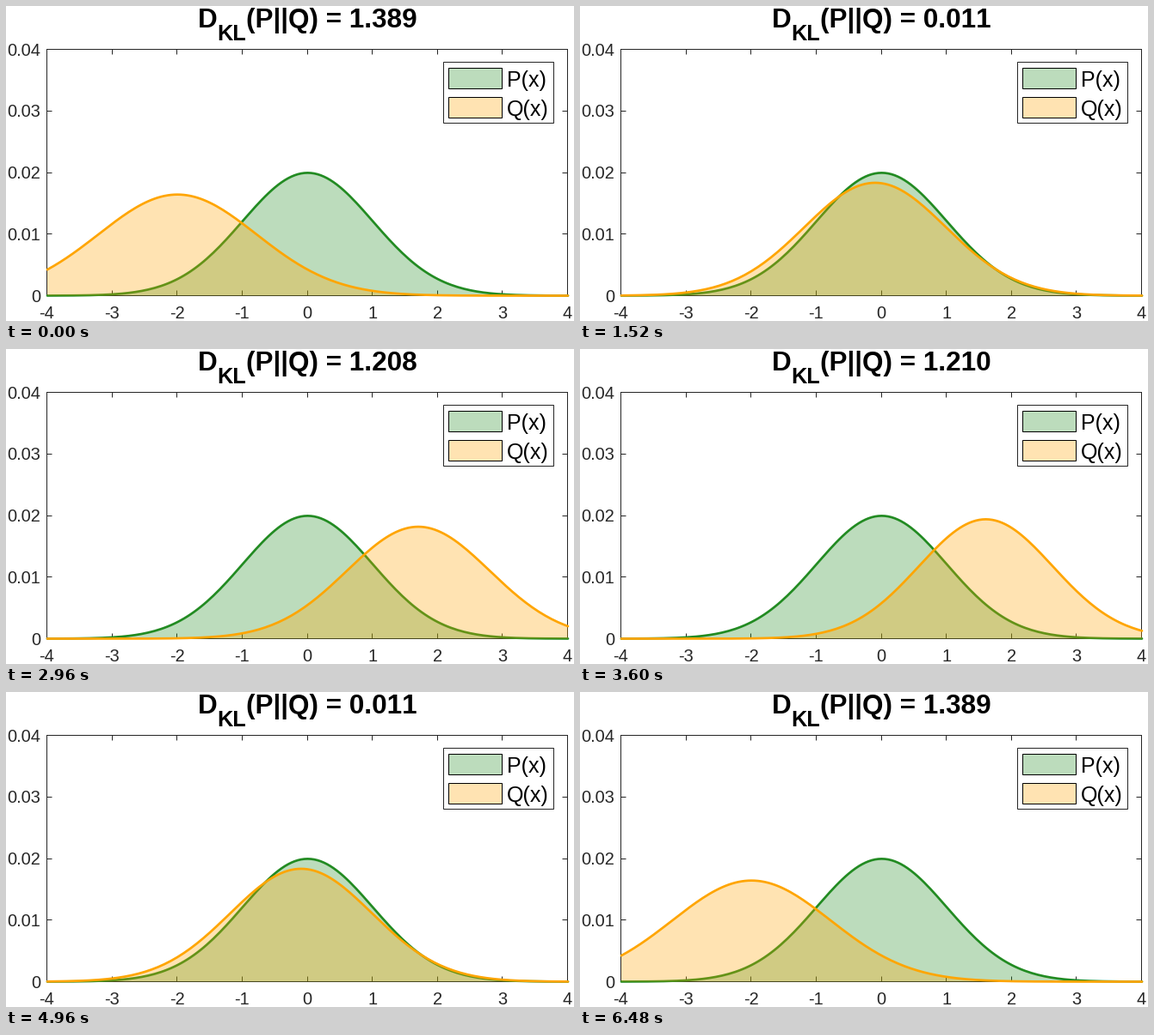
Animation of 660x367 px, one loop 6.56 s. Source, as a matplotlib script:

```python
import matplotlib.pyplot as plt
import numpy as np
from matplotlib.animation import FuncAnimation
from matplotlib.patches import Polygon, Rectangle
from matplotlib.transforms import Affine2D

W, H, DPI = 660, 367, 100
STEPS = 41
DX = 0.05
LEFT, RIGHT, TOP, BOTTOM = 47, 652, 50, 337
GREEN, ORANGE, INK = "#228b22", "#ffa500", "#262626"

plt.rcParams["font.family"] = "Liberation Sans"
plt.rcParams["text.kerning_factor"] = 6


def pt(px):
    return px * 72 / DPI


fig = plt.figure(figsize=(W / DPI, H / DPI), dpi=DPI, facecolor="white")
ax = fig.add_axes([LEFT / W, 1 - BOTTOM / H,
                   (RIGHT - LEFT) / W, (BOTTOM - TOP) / H])
ax.set(xlim=(-4, 4), ylim=(0, 0.04),
       xticks=range(-4, 5), yticks=np.arange(5) / 100)
ax.tick_params(direction="in", top=True, right=True, length=pt(6),
               width=pt(1), color=INK, labelbottom=False, labelleft=False)
for spine in ax.spines.values():
    spine.set(linewidth=pt(1), color=INK, zorder=1.5)


def label(x, y, text, size, **style):
    """Put text on the stage, with its baseline at pixel (x, y) from the top left."""
    return fig.text(x / W, 1 - y / H, text, fontsize=pt(size),
                    va="baseline", **style)


for i in range(9):
    label(LEFT + 0.5 + i * (RIGHT - LEFT) / 8, 364, str(i - 4), 20,
          ha="center", color=INK)
for i in range(5):
    label(40, BOTTOM - i * (BOTTOM - TOP) / 4 + 7.6,
          f"{i / 100:g}", 20, ha="right", color=INK)

# Title, with a lowered subscript
label(222.4, 25, "D", 31.5, weight="bold")
label(245.4, 40, "KL", 25.2, weight="bold")
title = label(279, 25, "", 31.5, weight="bold")


def box(x, y, w, h, face, edge="black", z=10):
    fig.add_artist(Rectangle((x / W, 1 - (y + h) / H), w / W, h / H,
                             transform=fig.transFigure, facecolor=face,
                             edgecolor=edge, linewidth=pt(1), zorder=z))


box(508, 65, 128, 71, "white", INK)
for y, color, name in ((72, GREEN, "P(x)"), (106, ORANGE, "Q(x)")):
    box(514, y, 62, 24, (color, 0.3), z=11)
    label(582, y + 22, name, 25, zorder=12)

x = np.linspace(-4, 4, 161)
# Curves run inside the frame line, which covers one whole pixel
inner = ax.transData + Affine2D().translate(1, -0.5)


def bell(mu, sigma):
    z = (x - mu) / sigma
    return DX * np.exp(-z * z / 2) / (sigma * np.sqrt(2 * np.pi))


def outline(y):
    return np.vstack([(-4, 0), np.column_stack([x, y]), (4, 0)])


def curve(color, z):
    area = Polygon(outline(0 * x), facecolor=color, alpha=0.3,
                   edgecolor="none", zorder=z, transform=inner,
                   clip_on=False)
    ax.add_patch(area)
    line, = ax.plot(x, 0 * x, color=color, lw=pt(2.7), zorder=z + 0.5,
                    transform=inner, clip_on=False,
                    solid_joinstyle="round", solid_capstyle="round")
    return area, line


def set_curve(parts, y):
    area, line = parts
    area.set_xy(outline(y))
    line.set_ydata(y)


p_curve = curve(GREEN, 2)
q_curve = curve(ORANGE, 3)
ax.set(xlim=(-4, 4), ylim=(0, 0.04))
set_curve(p_curve, bell(0, 1))

# Width of Q as a smooth function of its mean
KNOTS = np.array([
    (-2, 1.2146), (-1.55, 1.285), (-1.2, 1.05), (-0.9, 0.6844),
    (-0.75, 0.675), (-0.4, 1.06), (-0.25, 1.14), (-0.1, 1.088),
    (0.2, 0.825), (0.6, 0.63), (1, 0.6785), (1.3, 0.835),
    (1.6, 1.0288), (2, 1.31)])
KX, KY = KNOTS.T
KM = np.gradient(KY, KX)


def sigma_at(mu):
    """Cubic Hermite interpolation through the knots."""
    i = int(np.clip(np.searchsorted(KX, mu, side="right") - 1, 0, len(KX) - 2))
    h = KX[i + 1] - KX[i]
    t = (mu - KX[i]) / h
    s = t * t * (3 - 2 * t)
    return (KY[i] * (1 - s) + KY[i + 1] * s
            + h * t * (1 - t) * (KM[i] * (1 - t) - KM[i + 1] * t))


def update(k):
    step = k if k < STEPS else 2 * STEPS - 1 - k
    mu = round(-2 + 0.1 * step, 1)
    sigma = sigma_at(mu)
    set_curve(q_curve, bell(mu, sigma))
    kl = np.log(sigma) + (1 + mu * mu) / (2 * sigma ** 2) - 0.5
    title.set_text(f"(P||Q) = {kl:.3f}")
    return (*q_curve, title)


anim = FuncAnimation(fig, update, frames=2 * STEPS, interval=80,
                     repeat=True, repeat_delay=0, blit=False)
plt.show()
```
